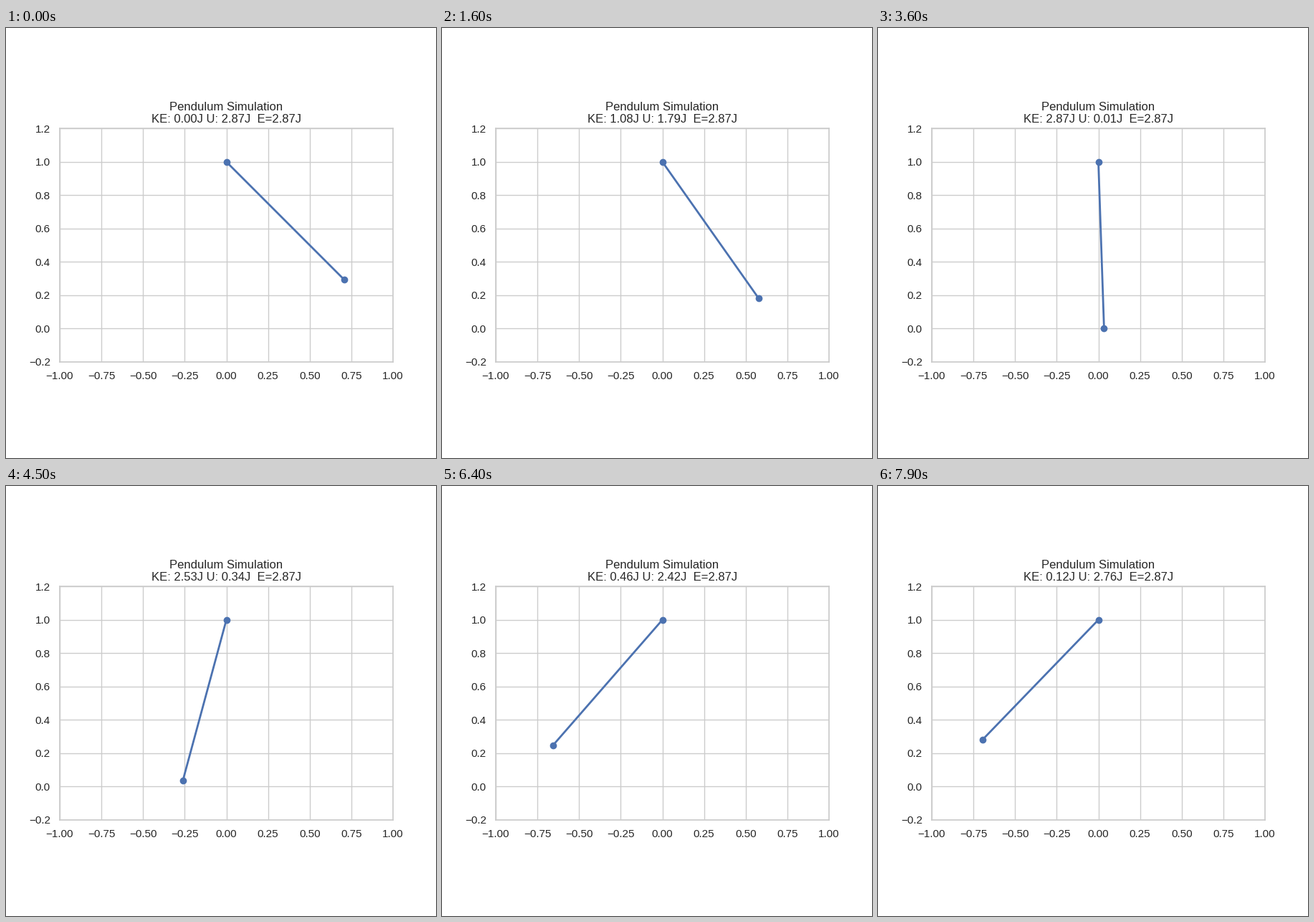
A matplotlib script that plays this animation: 600x600 px, repeating every 8000 ms.

```python
import numpy as np
import matplotlib.pyplot as plt
from matplotlib.animation import FuncAnimation

FRAMES, INTERVAL = 80, 100
G, LENGTH, MASS = 9.81, 1.0, 1.0
DT = 0.014093  # simulated seconds per frame
INK, GRID, BLUE = "0.15", "0.8", "#4C72B0"

plt.rcParams.update({
    "font.family": "Liberation Sans",
    "text.color": INK,
    "axes.edgecolor": GRID,
    "axes.linewidth": 1.25,
    "axes.axisbelow": True,
    "axes.titlesize": 12,
    "grid.color": GRID,
    "grid.linewidth": 1,
    "lines.solid_capstyle": "round",
})


def slope(state):
    theta, omega = state
    return np.array([omega, -G / LENGTH * np.sin(theta)])


def rk4(state, h):
    k1 = slope(state)
    k2 = slope(state + h / 2 * k1)
    k3 = slope(state + h / 2 * k2)
    k4 = slope(state + h * k3)
    return state + h / 6 * (k1 + 2 * k2 + 2 * k3 + k4)


states = [np.array([np.pi / 4, 0.0])]
for _ in range(FRAMES - 1):
    states.append(rk4(states[-1], DT))

fig, ax = plt.subplots(figsize=(6, 6), dpi=100, facecolor="white")
ax.set_aspect("equal")
ax.set(xlim=(-1, 1), ylim=(-0.2, 1.2),
       xticks=np.linspace(-1, 1, 9), yticks=np.linspace(-0.2, 1.2, 8))
ax.xaxis.set_major_formatter("{x:.2f}")
ax.yaxis.set_major_formatter(lambda y, _: f"{round(y, 1) + 0.0:.1f}".replace("-", "\u2212"))
ax.tick_params(length=6, pad=3.5, labelsize=11, labelcolor=INK,
               bottom=False, left=False)
ax.grid(True)

rod, = ax.plot([], [], "o-", color=BLUE, lw=2, markersize=6)
title = ax.set_title("")


def update(i):
    theta, omega = states[i]
    x, y = LENGTH * np.sin(theta), 1 - LENGTH * np.cos(theta)
    kinetic = MASS * (LENGTH * omega) ** 2 / 2
    potential = MASS * G * y
    rod.set_data([0, x], [1, y])
    title.set_text("Pendulum Simulation\n"
                   f"KE: {kinetic:.2f}J U: {potential:.2f}J  "
                   f"E={kinetic + potential:.2f}J")
    return rod, title


anim = FuncAnimation(fig, update, frames=FRAMES, interval=INTERVAL,
                     repeat=True, repeat_delay=0, blit=False)
plt.show()
```
